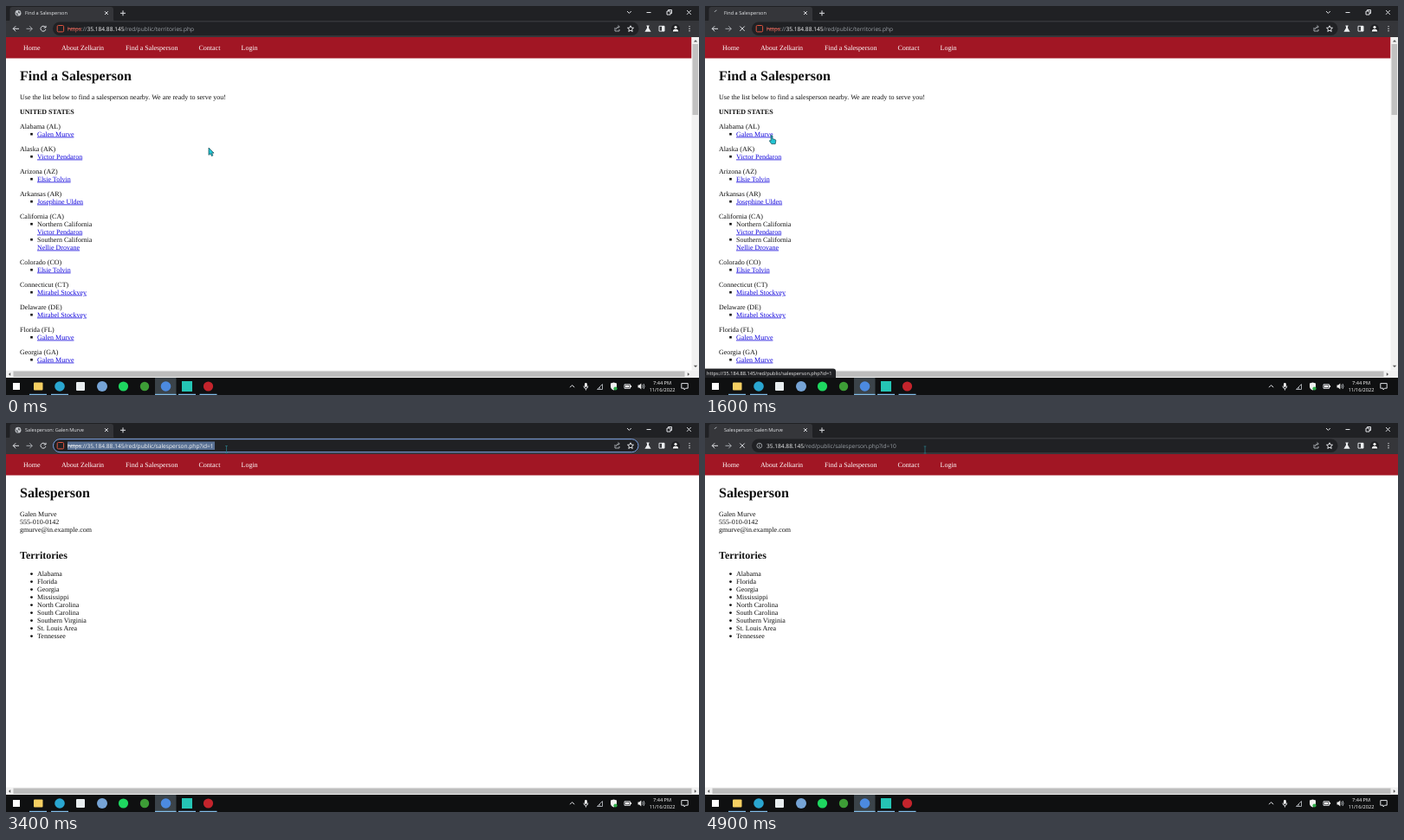
Recreate the animation shown at these times as an HTML page. Size 800 by 450 pixels, loop 5 s.

```html
<!DOCTYPE html>
<html lang="en">
<head>
<meta charset="utf-8">
<title>Browser session</title>
<style>
html, body { margin: 0; height: 100%; overflow: hidden; background: #fff }
svg { display: block; width: 800px; height: 450px }
text { text-rendering: geometricPrecision; white-space: pre }
.page text { font: 8px "Liberation Serif", serif; fill: #111 }
.page .h1 { font-size: 16px; font-weight: bold }
.page .h2 { font-size: 12px; font-weight: bold }
.page .b { font-weight: bold }
.page .a { fill: #1408dc; text-decoration: underline }
.page .nav { fill: #fff }
.ui { font: 6.6px "Open Sans", sans-serif; fill: #9aa0a6 }
.tab { font-size: 5.6px; fill: #e4e6e9 }
.w { fill: #f4f5f6 }
.bad { fill: #e4685c; text-decoration: line-through }
.line { fill: none; stroke: #dfe1e5; stroke-width: 1 }
.dim { stroke: #a5a9ae }
#drop > rect:first-child { filter: drop-shadow(0 2px 2px #0008) }
</style>
</head>
<body>
<svg id="stage" viewBox="0 0 800 450"></svg>
<script>
const LOOP = 5000, STEP = 100;
const IP = '35.184.88.145', DIR = '/red/public/', REP = DIR + 'salesperson.php?id=1';
const GALEN = 'Galen Murve', VICTOR = 'Victor Pendaron', ELSIE = 'Elsie Tolvin',
  MIRABEL = 'Mirabel Stockvey';

const text = (x, y, s, cls = '') => `<text x="${x}" y="${y}" class="${cls}">${s}</text>`;
const rect = (x, y, w, h, fill, r = 0) =>
  `<rect x="${x}" y="${y}" width="${w}" height="${h}" rx="${r}" fill="${fill}"/>`;
const disc = (x, y, r, fill) => `<circle cx="${x}" cy="${y}" r="${r}" fill="${fill}"/>`;
const path = (d, cls = 'line') => `<path d="${d}" class="${cls}"/>`;
const fill = (d, color) => `<path d="${d}" fill="${color}"/>`;
const group = (id, ...parts) => `<g id="${id}">${parts.join('')}</g>`;
const span = (s, cls) => `<tspan class="${cls}">${s}</tspan>`;
const globe = (x, y) => disc(x, y, 3.4, '#c3c6ca') +
  fill(`M${x - 2.8} ${y - .6}l2.2 .8 .6 2.4 -1.2 .2zM${x} ${y - 2.6}l2.4 1.4 -.6 1.8 -1.8 -1z`, '#55585d');

// Page contents

const nav = width => rect(0, 36, width, 24.5, '#a11624') +
  [[20, 'Home'], [64, 'About Zelkarin'], [138, 'Find a Salesperson'], [222.5, 'Contact'], [271.5, 'Login']]
    .map(([x, s]) => text(x, 51, s, 'nav')).join('');

function territories() {
  const states = [
    ['Alabama (AL)', GALEN], ['Alaska (AK)', VICTOR], ['Arizona (AZ)', ELSIE],
    ['Arkansas (AR)', 'Josephine Ulden'],
    ['California (CA)', ['Northern California', VICTOR], ['Southern California', 'Nellie Drovane']],
    ['Colorado (CO)', ELSIE], ['Connecticut (CT)', MIRABEL], ['Delaware (DE)', MIRABEL],
    ['Florida (FL)', GALEN], ['Georgia (GA)', GALEN]];
  let y = 141.5, out = '';
  for (const [state, ...people] of states) {
    out += text(16, y, state);
    for (const p of people) {
      const [area, name] = Array.isArray(p) ? p : ['', p];
      y += 9;
      out += rect(28.2, y - 3.6, 2.6, 2.6, '#111');
      if (area) { out += text(36, y, area); y += 9; }
      out += text(36, y, name, 'a');
    }
    y += 17;
  }
  return out;
}

const regions = ['Alabama', 'Florida', 'Georgia', 'Mississippi', 'North Carolina', 'South Carolina',
  'Southern Virginia', 'St. Louis Area', 'Tennessee'];

const hbar = width => rect(0, 421.5, 800, 8.5, '#f1f1f1') + rect(8.5, 422.5, width - 17, 6.5, '#bdbdbd') +
  fill(`M5.2 424l-2.2 2 2.2 2z`, '#555') + fill(`M${width - 5.2} 424l2.2 2 -2.2 2z`, '#555');

const listPage = group('list', nav(791.5),
  text(16, 86, 'Find a Salesperson', 'h1'),
  text(16, 107.5, 'Use the list below to find a salesperson nearby. We are ready to serve you!'),
  text(16, 124.5, 'UNITED STATES', 'b'), territories(), hbar(792),
  rect(791.5, 36, 8.5, 385.5, '#f1f1f1'), rect(792.5, 44, 6.5, 82, '#c1c1c1'),
  fill('M793.8 41.5l2.2 -2.2 2.2 2.2z', '#555'), fill('M793.8 415.8l2.2 2.2 2.2 -2.2z', '#555'));

const personPage = group('person', nav(800),
  text(16, 86, 'Salesperson', 'h1'),
  [GALEN, '555-010-0142', 'gmurve@in.example.com'].map((s, i) => text(16, 107.5 + 9 * i, s)).join(''),
  text(16, 157, 'Territories', 'h2'),
  regions.map((s, i) => disc(29.5, 174.6 + 9 * i, 1.4, '#111') + text(36, 177 + 9 * i, s)).join(''),
  hbar(800));

// Browser window

const url = (x, y, scheme, rest) => text(x, y, scheme + span(IP, 'w') + rest, 'ui');
const badScheme = span('https', 'bad') + '://';

const chrome = rect(0, 0, 800, 18, '#202124') +
  fill('M2 18q2.5 0 2.5 -3V4q0 -3 3 -3H121q3 0 3 3v11q0 3 2.5 3z', '#35363a') +
  rect(0, 17, 800, 19, '#35363a') +
  path('M114 6.2l3.8 3.8m0 -3.8l-3.8 3.8M132 8.3h6m-3 -3v6') +
  path('M717 6l2.4 2.4 2.4 -2.4M739.5 7.5h5M786 5l4.8 4.8m0 -4.8l-4.8 4.8') +
  path('M763 6h4v4h-4zM764.5 6V4.5h4v4h-1.5') +
  path('M15 26.3H8.2m3 -3l-3 3 3 3') + path('M23.5 26.3h6.8m-3 -3l3 3 -3 3', 'line dim') +
  rect(54, 18.5, 676.5, 15.5, '#202124', 7.7) +
  path('M703 25v4h5v-2M704.5 27q0 -3 3 -3m-1 -1.6l1.8 1.6 -1.8 1.6', 'line dim') +
  path('M721 22.8l1 2.3 2.5 .2 -1.9 1.7 .6 2.5 -2.2 -1.3 -2.2 1.3 .6 -2.5 -1.9 -1.7 2.5 -.2z') +
  fill('M739.4 22.5h3.2v1h-.6v2l2.6 4.2h-7.2l2.6 -4.2v-2h-.6z', '#eceef0') +
  path('M754 23.3h6v5.8h-6z') + rect(757, 23, 3, 6, '#eceef0') +
  disc(773, 26.2, 5, '#202124') + disc(773, 24.5, 1.6, '#fff') +
  fill('M769.8 29.4q0 -2.6 3.2 -2.6t3.2 2.6z', '#fff') +
  [23.6, 26.2, 28.8].map(y => disc(789, y, .7, '#eceef0')).join('') +
  group('favicon', globe(14, 8.2)) +
  group('spinner', path('M11 7a3.2 3.2 0 0 1 2.5 -2', 'line dim')) +
  group('tabList', text(22, 10.4, 'Find a Salesperson', 'ui tab')) +
  group('tabPerson', text(22, 10.4, 'Salesperson: ' + GALEN, 'ui tab')) +
  group('reload', path('M45.4 24.4a3 3 0 1 0 .5 2.6M46 22.8v2.2h-2.3')) +
  group('stop', path('M40.3 23.5l5.4 5.4m0 -5.4l-5.4 5.4')) +
  group('ring', `<rect x="54.5" y="18.7" width="675.5" height="15" rx="7.5" fill="none" stroke="#7ea4e6"/>`,
    ) +
  group('selection', rect(71, 21.5, 170, 9.5, '#587093')) +
  group('warn', `<rect x="59.2" y="22.5" width="7.4" height="7.4" rx="1.2" fill="none" stroke="#e0543f"/>`) +
  group('info', `<circle cx="62.8" cy="26.2" r="2.9" fill="none" stroke="#b4b8bd" stroke-width=".8"/>` +
    path('M62.8 25.8v2M62.8 24.3v.8', 'line dim')) +
  group('urlList', url(71, 28.6, badScheme, DIR + 'territories.php')) +
  group('urlPerson', url(71, 28.6, badScheme, REP)) +
  group('urlPicked', text(71, 28.6, span('https', 'w" text-decoration="line-through') +
    span('://' + IP + REP, 'w'), 'ui')) +
  group('urlNext', url(71, 28.6, '', REP + '0')) +
  group('caret', rect(241.3, 22, .7, 8.5, '#fff'));

const dropdown = group('drop', rect(51, 17, 682, 60, '#202124', 3),
  rect(51, 35.5, 682, 18.5, '#3a3b40'), rect(51, 35.5, 1.4, 18.5, '#8ab4f8'),
  globe(62.8, 26.2), globe(62.8, 44.6),
  `<circle cx="62" cy="62.7" r="2" class="line dim"/>`, path('M63.5 64.2l2.2 2.2', 'line dim'),
  url(76.5, 28.6, 'https://', REP + '0'), rect(250.6, 22, .7, 8.5, '#fff'),
  `<text x="76.5" y="47" class="ui" style="font-weight:700;fill:#7fa9ee">https://${IP}${REP}0</text>`,
  text(76.5, 65.9, span(`https://${IP}${REP}0`, 'w') + ' - Quelbo Search', 'ui'));

const status = group('status', fill('M0 419.5H148q3 0 3 3V430H0z', '#202124'),
  `<text x="2" y="427.2" class="ui w" style="font-size:5.67px;fill:#eee">https://${IP}${REP}</text>`);

// Taskbar

const label = (y, s) => `<text x="757.5" y="${y}" text-anchor="middle" class="ui" style="font-size:5.6px;fill:#fff">${s}</text>`;
const taskbar = rect(0, 430, 800, 20, '#0f1011') + rect(172, 430, 24.5, 20, '#3b4349') +
  [[27, 20], [52, 20], [172, 24.5], [199, 20], [223.5, 20]].map(([x, w]) => rect(x, 448.8, w, 1.2, '#83bde8')).join('') +
  rect(8, 436, 8, 8, '#fff') +
  rect(32, 435.5, 10.5, 9, '#f5cf62', 1) +
  disc(62, 440, 5.8, '#2aa6d0') + rect(81, 435, 10, 10, '#e9eef0', 1) +
  disc(111, 440, 6, '#76a4d6') + disc(135.5, 440, 5.6, '#1ed760') + disc(160, 440, 5.2, '#3d9d36') +
  disc(184.5, 440, 5.8, '#4c8ae0') + rect(203, 434, 12, 12, '#25c4b4') + disc(233.5, 440, 5.6, '#c3242c') +
  path('M651 441.2l2.6 -2.6 2.6 2.6') +
  rect(668, 436, 2.8, 5, '#fff', 1.4) + path('M667 439.5q0 3 2.4 3t2.4 -3M669.4 442.5v2') +
  path('M682.5 443.5l6 -6v6zM685.3 443.5v-2.6', 'line dim') +
  fill('M698 436.5l3.5 -1 3.5 1v3.5q0 3 -3.5 4.5 -3.5 -1.5 -3.5 -4.5z', '#f0f0f0') + disc(703.5, 442.5, 2.1, '#2fae4a') +
  path('M714 437.8h6.5v4.5H714z') + rect(715, 438.8, 4.5, 2.5, '#fff') + rect(721, 439, 1, 2, '#fff') +
  fill('M729.5 438.6h1.6l2.2 -2v7l-2.2 -2h-1.6z', '#eee') + path('M734.6 438.2q1.4 1.8 0 3.6M736 437q2.2 3 0 6', 'line dim') +
  label(438.2, '7:44 PM') + label(446.2, '11/16/2022') +
  path('M779.8 436.6h7.4v5.6h-2.6l-1.6 1.8v-1.8h-3.2z');

// Pointer shapes, each with its hot spot at 0,0

const ink = 'fill="#22c4d2" stroke="#12474f" stroke-width=".7" stroke-linejoin="round"';
const pointer = group('pointer',
  `<path id="arrow" d="M0 0V8.4L2 6.7 3.4 9.6 4.9 8.9 3.6 6.1H6z" ${ink}/>`,
  `<path id="hand" d="M-.9 0q.9 -1 1.7 0V3.6l3.2 .9q1 .3 .8 1.5L4.2 9.6H-.2L-2.6 6.2q-.2 -1.2 1.7 -.2z" ${ink}/>`,
  `<path id="beam" d="M-1.3 -4h2.6M0 -4v8M-1.3 4h2.6" fill="none" stroke="#2a7682" stroke-width=".8"/>`);

const stage = document.getElementById('stage');
stage.innerHTML = rect(0, 0, 800, 450, '#fff') + `<g class="page">${listPage}${personPage}</g>` +
  chrome + dropdown + status + taskbar + pointer;

const moves = [[0, 234, 164], [100, 234, 164], [800, 70, 155], [1100, 70, 155], [1400, 77, 150],
  [2000, 77, 150], [2900, 254, 31], [3300, 254, 31], [3500, 255, 30], [4000, 255, 30], [4200, 254, 31], [LOOP, 254, 31]];

function place(t) {
  const i = moves.findIndex(m => m[0] > t), [t0, x0, y0] = moves[i - 1], [t1, x1, y1] = moves[i];
  const p = (t - t0) / (t1 - t0), e = p * p * (3 - 2 * p);
  return [x0 + (x1 - x0) * e, y0 + (y1 - y0) * e];
}

function draw(now) {
  const t = Math.floor(now % LOOP / STEP) * STEP;
  const during = (a, b = LOOP) => t >= a && t < b;
  const list = t < 1800, loading = during(1500, 1800) || during(4900);
  const picked = during(3400, 4200), open = during(4300, 4900), next = during(4900);
  const [x, y] = place(t), hand = during(1300, 1800), beam = t > 2000 && y < 35;
  const visible = {
    list, person: !list, tabList: list, tabPerson: !list,
    favicon: !loading, spinner: loading, reload: !loading, stop: loading,
    ring: during(3400, 4300), selection: picked, caret: during(4200, 4300),
    warn: !next, info: next, urlList: list, urlPerson: !list && !picked && !next,
    urlPicked: picked, urlNext: next, drop: open, status: during(1300, 2000),
    hand, beam, arrow: !hand && !beam
  };
  for (const id in visible) document.getElementById(id).style.display = visible[id] ? '' : 'none';
  document.getElementById('pointer').setAttribute('transform', `translate(${x} ${y})`);
}

const start = performance.now();
(function tick() {
  draw(performance.now() - start);
  requestAnimationFrame(tick);
})();
</script>
</body>
</html>
```
